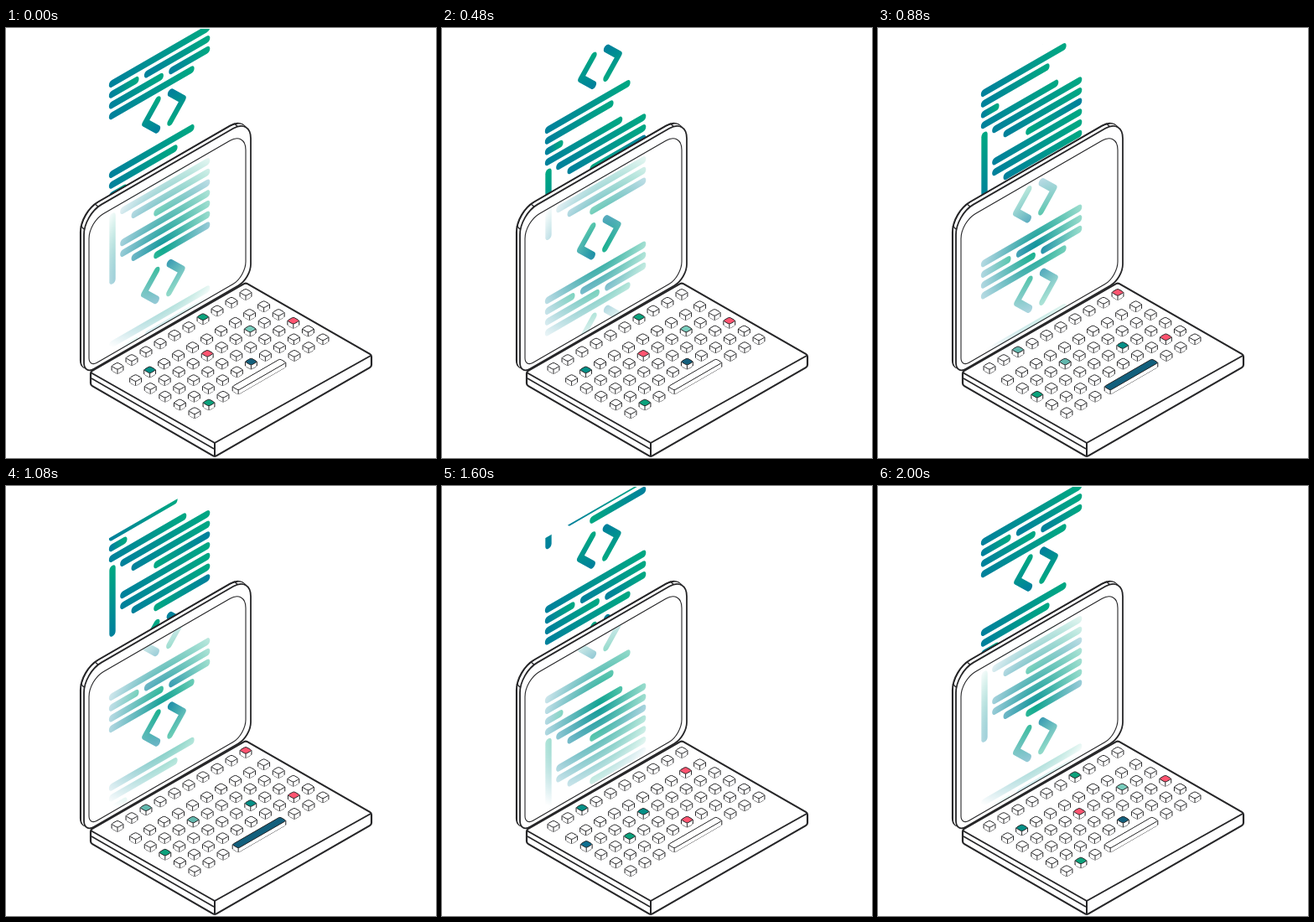
These frames come from a looping animation (513x513 px, 2.04 s). An HTML page with a canvas:

```html
<!DOCTYPE html>
<html lang="en">
<head>
<meta charset="utf-8">
<title>Laptop with scrolling code</title>
<style>
  html, body { margin: 0; width: 100%; height: 100%; overflow: hidden; background: #fff; }
  canvas { display: block; width: 513px; height: 513px; }
</style>
</head>
<body>
<canvas id="stage" width="513" height="513"></canvas>
<script>
const SIZE = 513, LOOP = 2040, STEP = 40, PERIOD = 311;
const INK = '#262628', BLUE = '#00819b', GREEN = '#00a783';
const COS = 0.866, TAN = 0.5774;

const ctx = document.getElementById('stage').getContext('2d');
const layer = document.createElement('canvas');
layer.width = layer.height = SIZE;
const glass = layer.getContext('2d');

// Code rows in tab units: start, end, optional gap
const TAB = 13.35, FULL = 9;
const ROWS = [
  [0, FULL], [0, FULL, 2.9], [0, FULL, 5.1], [0, 7.6],
  [0, 7.6], [0, 6.1], [0, 1.6], [0, 6.9],
  ...[1, 2, 4, 1, 1, 2, 4].map(tab => [tab, FULL])
];
const rowY = i => 66 + 12.72 * i + (i > 3 ? 57 : 0);

// Lit keys as row and column digits
const SETS = [
  { until: 560, keys: { '06': '#0ca27c', 27: '#79cdbd', 39: '#ff5470', 24: '#ff5470', 11: '#058f86', 45: '#135f7c', 51: '#0ca27c' } },
  { until: 1120, keys: { '09': '#ff5470', '02': '#62b8ae', 23: '#62b8ae', 36: '#058f86', 48: '#ff5470', 30: '#0ca27c', bar: '#135f7c' } },
  { until: 1680, keys: { '02': '#058f86', 18: '#ff5470', 24: '#058f86', 32: '#0ca27c', 20: '#0e6f90', 45: '#ff5470' } }
];

const iso = (x, y) => [x / COS, y + TAN * x];
const wall = c => c.setTransform(COS, -0.5, 0, 1, 0, 0);
const floor = (c, x, y) => c.setTransform(COS, -0.5, COS, 0.5, x, y);
const flat = c => c.setTransform(1, 0, 0, 1, 0, 0);

function trace(c, pts) {
  c.beginPath();
  pts.forEach(p => c.lineTo(p[0], p[1]));
}

function paint(fill, width) {
  if (fill) { ctx.fillStyle = fill; ctx.fill(); }
  if (width) { ctx.strokeStyle = INK; ctx.lineWidth = width; ctx.stroke(); }
}

function segment(x1, y1, x2, y2, width) {
  trace(ctx, [[x1, y1], [x2, y2]]);
  paint(null, width);
}

function line(c, pts, from = BLUE, to = GREEN) {
  const p = pts.map(q => iso(q[0], q[1]));
  const g = c.createLinearGradient(...p[0], ...p[p.length - 1]);
  g.addColorStop(0, from);
  g.addColorStop(1, to);
  c.strokeStyle = g;
  trace(c, p);
  c.stroke();
}

function codeRow(c, [start, end, gap], y) {
  const at = x => [x, y - TAN * (x - 127)];
  const word = (a, b) => {
    const ends = [at(126.5 + a * TAB), at(119.5 + b * TAB)];
    line(c, start === 4 ? ends.reverse() : ends);
  };
  if (gap) {
    word(start, gap - 0.25);
    word(gap + 0.25, end);
  } else {
    word(start, end);
  }
}

function brackets(c, cx, cy) {
  for (const s of [1, -1]) {
    const arm = [[-7.5, -13], [-22.5, 14], [-8, 22]];
    line(c, arm.map(([x, y]) => [cx + s * x, cy + s * y]), GREEN, BLUE);
  }
}

function strip(c, shift) {
  c.save();
  wall(c);
  c.lineCap = c.lineJoin = 'round';
  c.lineWidth = 8.5;
  for (let y = -shift; y < SIZE; y += PERIOD) {
    ROWS.forEach((row, i) => codeRow(c, row, y + rowY(i)));
    line(c, [[127, 225 + y], [127, 301 + y]], GREEN, BLUE);
    brackets(c, 188.5, 99 + y);
    brackets(c, 187.3, 302.5 + y);
  }
  c.restore();
}

function lidPath(depth, padX, padY, radii) {
  const [u, v] = iso(93 - depth + padX, 222.6 - 0.75 * depth + padY);
  wall(ctx);
  ctx.beginPath();
  ctx.roundRect(u, v, (199 - 2 * padX) / COS, 191 - 2 * padY, radii);
  flat(ctx);
}

const OUTER = [24, 24, 17, 14], INNER = [20, 22, 18, 11];

function lid() {
  lidPath(4, 0, 0, OUTER);
  paint('#fff', 2.2);
  for (let k = 3; k >= 0; k--) {
    lidPath(k, 0, 0, OUTER);
    paint('#fff', k ? 0 : 1.8);
  }
  segment(89, 236, 93, 240, 1.5);
  segment(106, 210, 110, 213, 1.5);
  segment(272, 114, 276, 117, 1.5);
  lidPath(0, 6, 8.8, INNER);
  paint('#fff', 1.1);
}

function screen(shift) {
  flat(glass);
  glass.clearRect(0, 0, SIZE, SIZE);
  strip(glass, shift);
  glass.save();
  wall(glass);
  const [u, v] = iso(188, 262);
  const fade = glass.createRadialGradient(u, v, 0, u, v, 110);
  fade.addColorStop(0, 'rgba(0,0,0,0.95)');
  fade.addColorStop(1, 'rgba(0,0,0,0)');
  glass.globalCompositeOperation = 'destination-in';
  glass.fillStyle = fade;
  glass.fillRect(-100, -100, 1000, 1200);
  glass.restore();

  ctx.save();
  lidPath(0, 6.5, 9.3, INNER);
  ctx.clip();
  ctx.drawImage(layer, 0, 0);
  ctx.restore();
}

function base() {
  const corners = [[101, 410], [286, 304], [436, 390], [436, 404], [249, 511.5], [101, 426]];
  ctx.beginPath();
  ctx.moveTo(101, 416);
  corners.forEach(([x, y], i) => {
    const next = corners[(i + 1) % corners.length];
    ctx.arcTo(x, y, next[0], next[1], 4);
  });
  ctx.closePath();
  paint('#fff', 2.2);
  segment(101, 411, 249, 495, 2);
  segment(102, 418, 248, 502, 1.5);
  segment(249, 495, 435, 391, 2);
  segment(249, 495, 249, 511, 2);
}

// Rounded block lying on the keyboard, centred on its top face
function block(x, y, length, height, tint) {
  const a = length / 2, b = 4.3, r = 2;
  const face = lift => {
    floor(ctx, x, y + lift);
    ctx.beginPath();
    ctx.roundRect(-a, -b, 2 * a, 2 * b, r);
    flat(ctx);
  };
  face(height);
  paint('#fff', 1);
  for (let k = height; k > 0; k--) {
    face(k);
    paint('#fff');
  }
  face(0);
  paint(tint || '#fff', 1);

  const inset = 0.29 * r;
  const side = COS * (a + b - inset * 2 + inset), slope = (a - b) / 2;
  segment(x - side, y + slope, x - side, y + slope + height, 1);
  segment(x + side, y - slope, x + side, y - slope + height, 1);
  const fx = COS * (b - a), fy = (a + b - inset) / 2;
  segment(x + fx, y + fy, x + fx, y + fy + height, 1);
}

function keyboard(t) {
  const { keys } = SETS.find(s => t < s.until) || SETS[0];
  for (let r = 0; r < 6; r++) {
    const x = 133 + 17.6 * r + (r ? 4 : 0);
    const y = 403.3 + 9.78 * r + (r ? 4.5 : 0);
    for (let i = 0; i < 10; i++) {
      if (r === 5 && i > 2 && i < 7) continue;
      block(x + 17 * i, y - 9.77 * i, 8.6, 5, keys['' + r + i]);
    }
  }
  block(302, 413.5, 66, 5, keys.bar);
}

// Slow first second, faster second one
function travel(t) {
  const d = t < 1000 ? 0.11 * t : 110 + 0.201 * (t - 1000);
  return d % PERIOD;
}

function draw(t) {
  const shift = travel(t);
  flat(ctx);
  ctx.fillStyle = '#fff';
  ctx.fillRect(0, 0, SIZE, SIZE);
  ctx.lineJoin = 'round';

  ctx.save();
  ctx.beginPath();
  ctx.rect(0, 1, SIZE, SIZE);
  ctx.clip();
  const edge = (x, y) => [x, y - TAN * (x - 127)];
  trace(ctx, [edge(110, 60), edge(255, 60), edge(255, 235), edge(110, 235)]);
  ctx.clip();
  strip(ctx, shift);
  ctx.restore();

  lid();
  screen(shift);
  base();
  keyboard(t);
}

const start = performance.now();
function tick() {
  const t = (performance.now() - start) % LOOP;
  draw(Math.floor(t / STEP) * STEP);
  requestAnimationFrame(tick);
}
tick();
</script>
</body>
</html>
```
